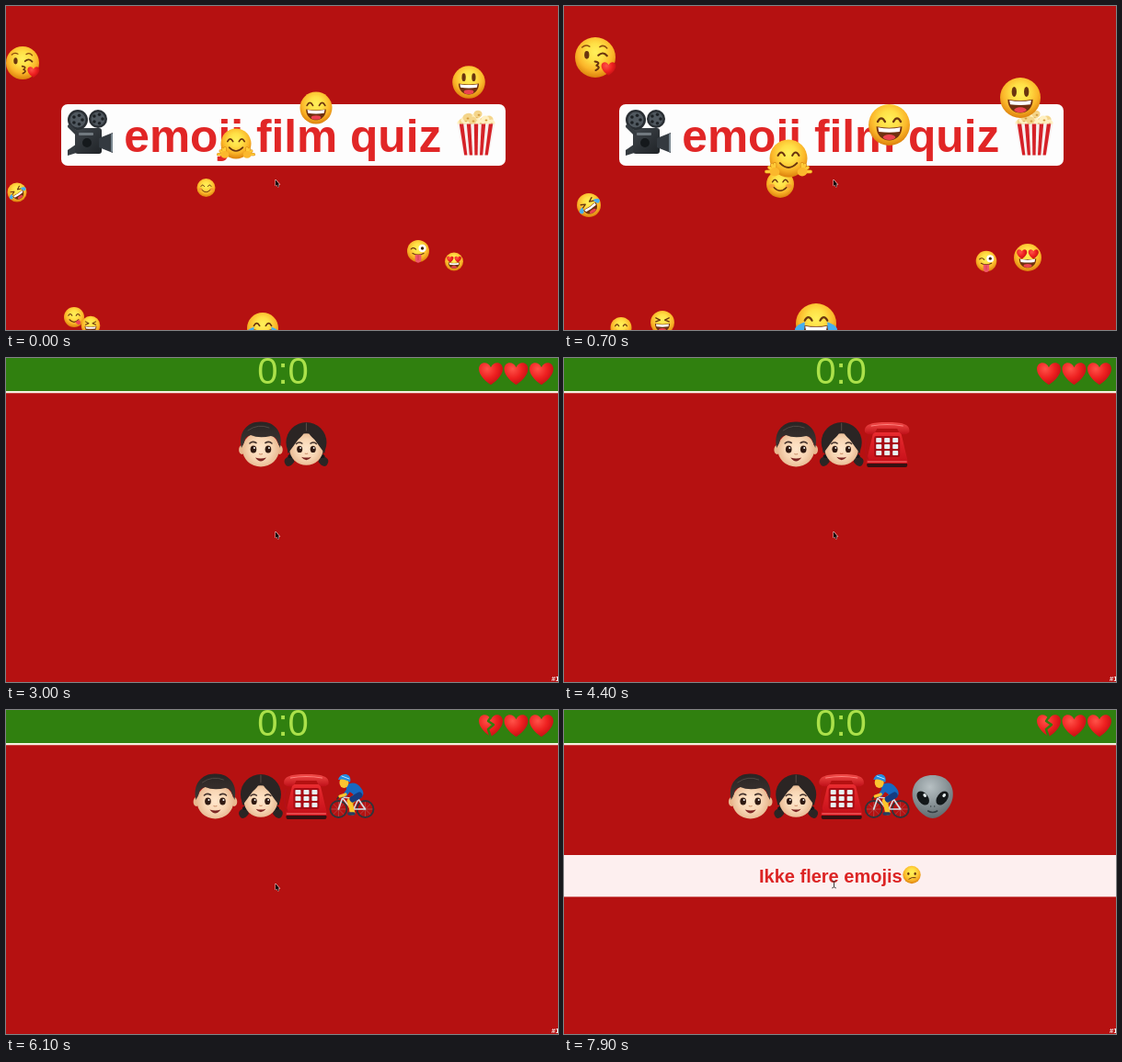
Write an HTML page with a canvas that moves like this. It is 600 px wide and 353 px high and loops after 8 s.

```html
<!DOCTYPE html>
<html lang="no">
<meta charset="utf-8">
<title>Emoji film quiz</title>
<style>
html, body { margin: 0; width: 100%; height: 100%; overflow: hidden; background: #b51111 }
canvas { display: block }
</style>
<canvas width="600" height="353"></canvas>
<script>
const c = document.querySelector('canvas').getContext('2d');
const LOOP = 8000, STEP = 100;
const BROWN = '#6a350f', FONT = '"Liberation Sans", Arial, sans-serif';
const HEART = 'M0,.95C-.3,.75-1,.2-1,-.38C-1,-1-.25,-1.1 0,-.52C.25,-1.1 1,-1 1,-.38C1,.2 .3,.75 0,.95Z';

function at(x, y, scale, draw, angle = 0) {
  c.save();
  c.translate(x, y);
  c.rotate(angle);
  c.scale(scale, scale);
  draw();
  c.restore();
}
function fill(d, color) {
  c.fillStyle = color;
  c.fill(new Path2D(d));
}
function line(d, color, width) {
  c.strokeStyle = color;
  c.lineWidth = width;
  c.lineCap = c.lineJoin = 'round';
  c.stroke(new Path2D(d));
}
function oval(x, y, rx, ry, color, angle = 0) {
  c.fillStyle = color;
  c.beginPath();
  c.ellipse(x, y, rx, ry, angle, 0, 7);
  c.fill();
}
function box(x, y, w, h, color, r = 0) {
  c.fillStyle = color;
  c.beginPath();
  c.roundRect(x, y, w, h, r);
  c.fill();
}
function text(str, x, y, font, color, align = 'left') {
  c.font = font + ' ' + FONT;
  c.fillStyle = color;
  c.textAlign = align;
  c.fillText(str, x, y);
}
function glow(x, y, r, ...colors) {
  const g = c.createRadialGradient(x, y, 0, x, y, r);
  colors.forEach((col, i) => g.addColorStop(i / (colors.length - 1), col));
  return g;
}
function fade(x0, y0, x1, y1, ...colors) {
  const g = c.createLinearGradient(x0, y0, x1, y1);
  colors.forEach((col, i) => g.addColorStop(i / (colors.length - 1), col));
  return g;
}

// Faces are drawn in a circle of radius 1.
const ball = () => oval(0, 0, 1, 1, glow(0, -.25, 1.3, '#fff05a', '#ffe046', '#fbb62a', '#d87a08'));
const eye = (x, y = -.2, h = .2) => oval(x, y, .12, h, BROWN);
const happy = x => line(`M${x - .18},-.15Q${x},-.48 ${x + .18},-.15`, BROWN, .1);
const squint = s => line(`M${s * .55},-.4L${s * .2},-.22L${s * .55},-.08`, BROWN, .1);
const smile = () => line('M-.45,.25Q0,.72 .45,.25', BROWN, .1);
const both = f => { f(-.38); f(.38); };
const heart = (x, y, s) => at(x, y, s, () => fill(HEART, glow(-.3, -.4, 1.6, '#ff5349', '#ee2020', '#b50a10')));
function laugh() {
  fill('M-.62,.08Q0,.2 .62,.08C.62,.98-.62,.98-.62,.08Z', '#70300f');
  fill('M-.54,.12Q0,.23 .54,.12L.5,.33Q0,.4-.5,.33Z', '#fff');
  oval(0, .6, .3, .13, '#ec4350');
}
function tear(x, y, s, angle) {
  at(x, y, s, () => fill('M0,-1C.4,-.4 .65,0 .6,.45C.5,1-.5,1-.6,.45C-.65,0-.4,-.4 0,-1Z', '#45aef0'), angle);
}
function hand(s) {
  c.save();
  c.scale(s, 1);
  for (let i = 0; i < 4; i++) line(`M.75,.7L${.72 + i * .15},${.3 + i * i * .045}`, '#d98812', .2);
  for (let i = 0; i < 4; i++) line(`M.75,.7L${.72 + i * .15},${.3 + i * i * .045}`, '#ffcb38', .14);
  oval(.73, .72, .26, .23, '#fbb82d');
  c.restore();
}

const faces = {
  kiss() {
    eye(-.42, -.12); line('M.15,-.1Q.38,-.32 .58,-.08', BROWN, .1);
    line('M-.65,-.5Q-.48,-.66-.28,-.54M.22,-.52Q.42,-.65 .58,-.46', '#8d4b0e', .07);
    line('M-.02,.2Q.28,.24 .06,.4Q.3,.5 .02,.64', BROWN, .09);
    heart(.66, .56, .36);
  },
  grin() { both(x => eye(x * .8, -.3, .25)); laugh(); },
  beam() { both(happy); laugh(); },
  hug() { both(happy); smile(); hand(-1); hand(1); },
  blush() {
    both(x => oval(x * 1.6, .15, .22, .15, '#f58a3999'));
    both(happy); smile();
  },
  rolling() {
    at(0, 0, 1, () => { squint(-1); squint(1); laugh(); tear(-.75, .05, .3, .7); tear(.75, .05, .3, -.7); }, -.6);
  },
  wacky() {
    line('M-.65,-.18Q-.42,-.4-.2,-.15', BROWN, .1);
    oval(.38, -.25, .35, .35, '#fff'); oval(.38, -.25, .14, .14, '#3a2410');
    line('M-.5,.2Q0,.48 .5,.2', BROWN, .1);
    fill('M-.28,.32Q0,.4 .28,.32V.8C.26,1.15-.26,1.15-.28,.8Z', '#f0566a');
    line('M0,.42V.8', '#c9364d', .06);
  },
  love() { laugh(); heart(-.42, -.25, .37); heart(.42, -.25, .37); },
  yum() {
    both(happy); smile();
    fill('M.1,.5L.42,.27C.75,.32 .68,.8 .4,.75Z', '#ed4455');
  },
  squint() { squint(-1); squint(1); laugh(); },
  joy() { both(happy); laugh(); tear(-.76, .22, .36, .6); tear(.76, .22, .36, -.6); },
  confused() { both(x => eye(x, -.12, .17)); line('M-.32,.48Q0,.22 .42,.32', BROWN, .1); }
};
const face = (name, x, y, r) => at(x, y, r, () => { ball(); faces[name](); });

// name, then x, y, radius at 0 ms and at 700 ms
const floaters = [
  ['kiss', 18, 62, 18, 34, 56, 22],
  ['blush', 217.5, 198, 10, 235, 194, 15],
  ['hug', 250, 150, 16.5, 244, 166, 20.5],
  ['grin', 503, 83, 17.8, 496, 100, 22],
  ['beam', 337, 111, 17.5, 353.5, 129.5, 22.5],
  ['rolling', 12, 203, 10.5, 27, 217, 13],
  ['wacky', 448, 267, 12, 459, 278, 11.3],
  ['love', 487, 278.5, 10, 504, 274, 15],
  ['yum', 74, 339, 11, 62, 350.5, 11.5],
  ['squint', 92, 348, 10.3, 107, 345, 13],
  ['joy', 279, 351, 17, 274, 346, 22]
];

function camera() {
  const dark = fade(-20, -20, 15, 20, '#4b5157', '#202428');
  fill('M-24,19L-8,8V20L-24,25Z', '#353b40');
  box(-16, -5, 29, 28, dark, 3);
  fill('M10,6L25,0V22L10,16Z', '#343a40');
  line('M24,2V20', '#7a8790', 2);
  for (const [x, y, r] of [[-13, -14, 11], [9, -15, 10]]) {
    oval(x, y, r, r, '#292e33');
    oval(x, y, r - 2.5, r - 2.5, '#50585f');
    for (let i = 0; i < 5; i++) oval(x + 5 * Math.cos(i * 1.257), y + 5 * Math.sin(i * 1.257), 1.8, 1.8, '#1c2024');
  }
  box(-12, 0, 16, 3, '#71797f', 1);
  oval(-3, 11, 5, 5, '#15191c');
  line('M-22,-7L-14,1', '#353b40', 4);
}
function popcorn() {
  for (let i = 0; i < 17; i++) {
    const x = (i * 7 % 17) * 2 - 16, y = -10 - (i * 5 % 4) * 3.6 * (1 - Math.abs(x) / 22);
    oval(x, y, 4.5, 4, i % 2 ? '#f4d58a' : '#fff0c1');
    oval(x + 1, y + 1, 1.4, 1, '#d39b3d');
  }
  fill('M-20,-9H20L14,24Q0,27-14,24Z', '#f7eeee');
  for (let i = -2; i <= 2; i++) {
    const x = i * 8;
    fill(`M${x - 2.2},-9H${x + 2.2}L${x * .7 + 1.6},25H${x * .7 - 1.6}Z`, '#d52127');
  }
}
function kidFace(y) {
  const skin = glow(0, y, 24, '#ffe6cb', '#f8d6b4', '#e0ac82');
  oval(0, y, 20, 19, skin);
  for (const s of [-1, 1]) {
    oval(s * 8, y, 3.3, 4, '#2f1a12');
    oval(s * 8 + 1, y - 1.5, 1, 1.1, '#fff');
    line(`M${s * 5},${y - 7}Q${s * 9},${y - 9.5} ${s * 12},${y - 6.5}`, '#41302a', 1.6);
  }
  line(`M-1.5,${y + 5}Q0,${y + 6} 1.5,${y + 5}`, '#d29a75', 1.2);
  fill(`M-6,${y + 9}Q0,${y + 11} 6,${y + 9}Q0,${y + 17}-6,${y + 9}Z`, '#7b2523');
}
function boy() {
  for (const s of [-1, 1]) oval(s * 20.5, 6, 3.3, 5, '#e9b78e');
  kidFace(5.5);
  fill('M-21,4C-25,-14-14,-25 0,-24.5C15,-25 25,-13 21,4L18,-3Q17,-8 11,-9Q-2,-6-11,-10Q-18,-8-18,-2Z', fade(0, -24, 0, 2, '#2a2524', '#3d3532'));
  line('M-14,-15Q-3,-23 9,-18', '#514843', 1);
}
function girl() {
  for (const s of [-1, 1]) {
    fill(`M${s * 15},12Q${s * 28},15 ${s * 22},23Q${s * 18},26 ${s * 13},19Z`, '#2b2524');
    oval(s * 17, 13, 3, 2, '#16181b');
  }
  oval(0, -2, 22, 22, '#2b2524');
  at(0, 0, .91, () => kidFace(6));
  fill('M0,-22C-16,-22-22,-8-20,10Q-14,2-9,-5Q-3,-10 0,-17Q3,-10 9,-5Q14,2 20,10C22,-8 16,-22 0,-22Z', '#2b2524');
  line('M0,-23V-15', '#675650', .8);
}
function phone() {
  box(-22, 20, 44, 5, '#351112', 2);
  fill('M-15,-13H15L23,21H-23Z', fade(0, -14, 0, 22, '#ea2c30', '#c40e17'));
  line('M-21,19H21', '#f2575a', 1.3);
  box(-14, -9, 28, 23, '#a80c14', 2);
  for (let i = 0; i < 9; i++) box(i % 3 * 9 - 12, (i / 3 | 0) * 7 - 7, 6, 5, '#e8f0f2', .8);
  fill('M-24,-13C-26,-22-16,-24 0,-24C16,-24 26,-22 24,-13Q18,-8 13,-13L11,-17H-11L-13,-13Q-18,-8-24,-13Z', fade(0, -24, 0, -10, '#f14b48', '#bd0d16'));
  line('M-17,-20Q0,-23 17,-20', '#ff8580', 1.2);
  line('M-22,-8Q-26,4-21,16', '#b31119', 1.6);
}
function cyclist() {
  for (const x of [-14.5, 14.5]) {
    for (let i = 0; i < 4; i++) {
      const a = i * Math.PI / 4, dx = 8 * Math.cos(a), dy = 8 * Math.sin(a);
      line(`M${x - dx},${14 - dy}L${x + dx},${14 + dy}`, '#a98d8d', .4);
    }
    c.beginPath();
    c.arc(x, 14, 9, 0, 7);
    c.strokeStyle = '#30343a';
    c.lineWidth = 1.9;
    c.stroke();
  }
  line('M6,0L-1,7L0,18', '#d99b20', 5);
  line('M-14.5,14L-10,1L7,3L1,16L-10,2M7,3L14.5,14H1', '#d7dde2', 1.7);
  line('M-10,1L-14,0L-16,3', '#333', 1.5);
  line('M8,-3L-3,5L1,18', '#fcc52d', 5);
  line('M2,19H-3', '#253c61', 3.5);
  fill('M-6,-12Q3,-18 10,-9Q15,-3 10,2L4,1Q0,-5-6,-6Z', '#1769c1');
  line('M8,-1L1,3', '#173c80', 7);
  line('M-2,-9L-7,-2', '#1769c1', 4.5);
  line('M-7,-2L-13,0', '#fcc52d', 3.2);
  oval(-8.5, -15, 5, 6, '#fbc431');
  fill('M-15,-18Q-13,-25-6,-24Q0,-22-2,-15Q-8,-20-15,-18Z', '#238be0');
  line('M-11,-22L-3,-19', '#bce5ff', 1);
}
function alien() {
  fill('M0,-23C15,-23 23,-13 22,0C21,12 9,24 0,24C-9,24-21,12-22,0C-23,-13-15,-23 0,-23Z', glow(-3, -10, 35, '#b7c0c3', '#8c969a', '#5e676b'));
  for (const s of [-1, 1]) {
    oval(s * 10.5, 2, 5.5, 8.5, '#14181a', s * .65);
    oval(s * 10.5 + 2, -1, 1.6, 2.2, '#e6eef0', s * .65);
    oval(s * 2, 11, .7, 1, '#4a5357');
  }
  line('M-5,16Q0,19 5,16', '#343c40', 1.5);
}

function pointer(beam) {
  if (beam) {
    line('M291.5,186Q293.5,186 293.5,188V192Q293.5,194 291.5,194M295.5,186Q293.5,186 293.5,188V192Q293.5,194 295.5,194', '#333', .8);
    return;
  }
  const arrow = 'M293,189.5V196L294.5,194.8L295.6,197.2L296.6,196.7L295.5,194.4H297.2Z';
  line(arrow, '#e8c8c8', 1);
  fill(arrow, '#000');
}

function intro(t) {
  box(60, 107, 483, 67, '#fdfdfd', 7);
  at(91, 138, 1, camera);
  at(511, 137.5, 1, popcorn);
  text('emoji film quiz', 128.3, 159, 'bold 49.7px', '#e12626');
  const p = t / 700;
  for (const [name, x, y, r, x1, y1, r1] of floaters)
    face(name, x + (x1 - x) * p, y + (y1 - y) * p, r + (r1 - r) * p);
}

// each clue and the time it joins the row
const clues = [[boy, 1000], [girl, 2900], [phone, 4000], [cyclist, 5100], [alien, 6200]];

function game(t) {
  box(0, 0, 600, 36, '#30800f');
  box(0, 36, 600, 2.3, '#f6eee0');
  text('0:0', 301, 28, '40px', '#abe14a', 'center');
  for (let i = 0; i < 3; i++) heart(527 + i * 27.5, 17, 13);
  if (t >= 5100) line('M529,5L524,12L530,16L524,21L527,30', '#30800f', 2.4);
  const row = clues.filter(([, start]) => t >= start);
  row.forEach(([draw], i) => at(301.7 + (i - (row.length - 1) / 2) * 49.5, 94, 1, draw));
  if (t >= 6200) {
    box(0, 158, 600, 45.5, '#fdefef');
    text('Ikke flere emojis', 212, 188, 'bold 20px', '#dc2424');
    face('confused', 378, 179.5, 9.7);
  }
  text('#1', 593, 351.5, 'bold 7.5px', '#fff');
}

function frame() {
  const t = Math.floor(performance.now() % LOOP / STEP) * STEP;
  box(0, 0, 600, 353, '#b51111');
  t < 1000 ? intro(t) : game(t);
  pointer(t >= 6200);
  requestAnimationFrame(frame);
}
frame();
</script>
</html>
```
